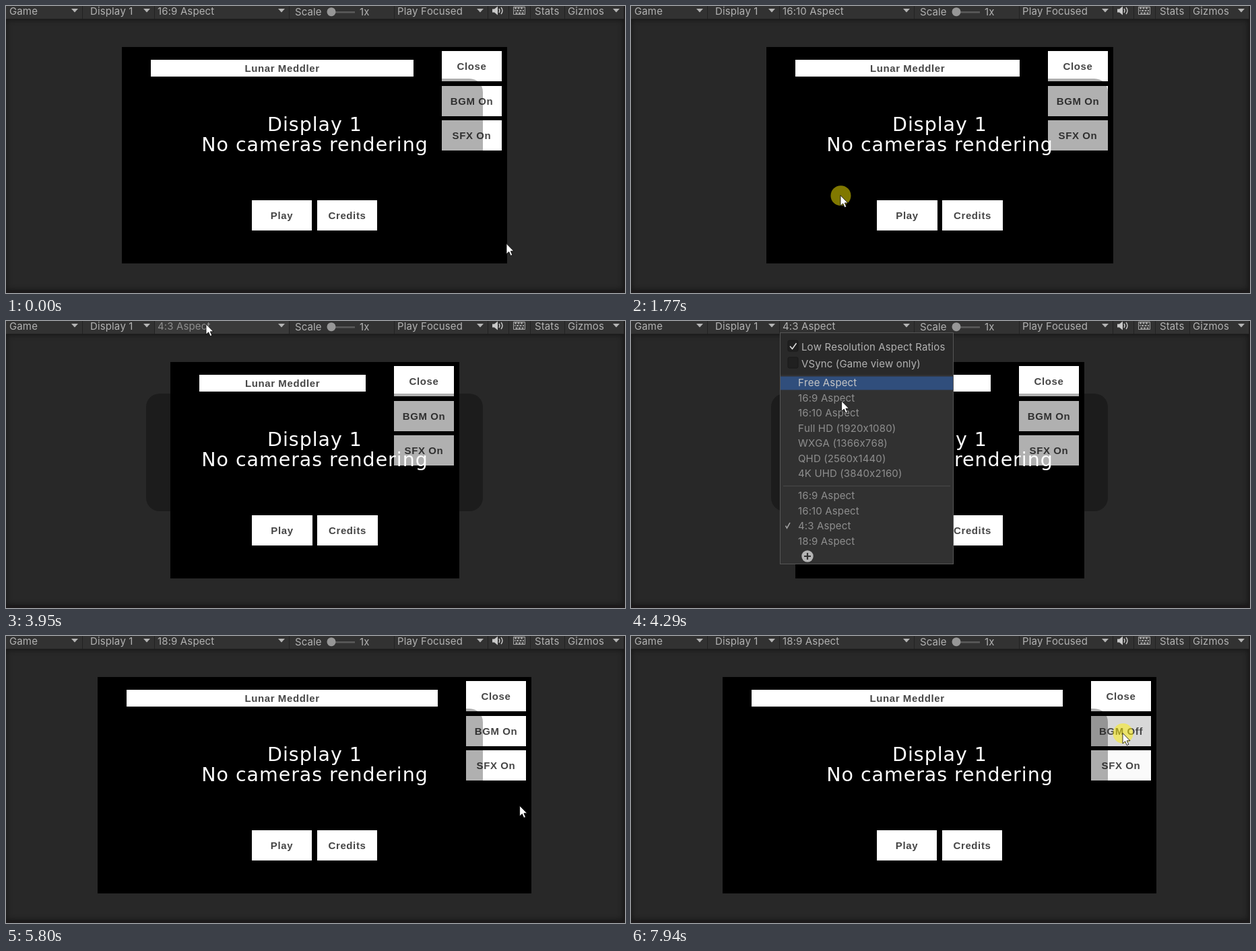
These frames come from a looping animation (919 px wide and 427 px high, 8 s). An HTML page:

```html
<!DOCTYPE html>
<html lang="en">
<head>
<meta charset="utf-8">
<title>Game view</title>
<style>
  html, body { margin: 0; width: 100%; height: 100%; overflow: hidden; background: #282828; }
  #panel { position: absolute; left: 0; top: 20px; width: 917px; height: 403px; box-shadow: inset 0 0 9px #141414; }
  svg { position: absolute; left: 0; top: 0; display: block; }
  text { white-space: pre; }
  .ui {
    font: 15px Inter, sans-serif; letter-spacing: .13px; fill: #b2b2b2;
    font-kerning: none; font-feature-settings: "calt" 0;
  }
  .dim { fill: #8e8e8e; }
  .lit { fill: #c6c6c6; }
  .label { font: bold 15px "Liberation Sans", Arial, sans-serif; letter-spacing: .6px; fill: #464646; text-anchor: middle; }
  .notice { font: 28.5px "DejaVu Sans", Verdana, sans-serif; letter-spacing: .95px; fill: #fff; text-anchor: middle; }
</style>
</head>
<body>
<div id="panel"></div>
<svg id="stage" width="919" height="427" viewBox="0 0 919 427">
  <rect y="423" width="919" height="4" fill="#1c191a"/>
  <rect x="917" width="2" height="427" fill="#1c1a1a"/>
  <g id="toolbar"></g>
  <g id="game"></g>
  <rect x="208" y="108" width="500" height="175" rx="20" opacity=".31"/>
  <text class="notice" x="458.5" y="186">Display 1</text>
  <text class="notice" x="458.5" y="216">No cameras rendering</text>
  <g id="menu"></g>
  <circle id="ring" r="15" fill="#fff000" opacity=".5"/>
  <path id="cursor" d="M-1 -.5v15.5l3.7-3.3 2.5 5.8 2.6-1.1-2.5-5.6h4.7z" fill="#fff" stroke="#000" stroke-width=".8"/>
</svg>
<script>
const LOOP = 8000;
const $ = id => document.getElementById(id);

function add(parent, tag, attrs, content = '') {
  const node = document.createElementNS('http://www.w3.org/2000/svg', tag);
  set(node, attrs);
  node.textContent = content;
  return parent.appendChild(node);
}
function set(node, attrs) {
  for (const key in attrs) node.setAttribute(key, attrs[key]);
}
const show = (node, on) => set(node, { visibility: on ? 'visible' : 'hidden' });
const rect = (parent, x, y, width, height, fill) => add(parent, 'rect', { x, y, width, height, fill });
const text = (parent, x, y, content, cls = 'ui') => add(parent, 'text', { x, y, class: cls }, content);
const path = (parent, d, stroke, width) =>
  add(parent, 'path', { d, fill: 'none', stroke, 'stroke-width': width });

// Toolbar
const bar = $('toolbar');
rect(bar, 0, 0, 917, 19, '#323232');
rect(bar, 0, 19, 917, 1.5, '#1d1d1d');
const aspectBox = rect(bar, 221, 0, 199, 19, '#3a3a3a');

// Each cell: left edge, label, baseline and whether it drops down at its right edge.
function cell(left, right, label, baseline, drops) {
  rect(bar, right, 0, 1, 19, '#222');
  if (drops) add(bar, 'path', { d: `M${right - 16} 4h10l-5 5.5z`, fill: '#b4b4b4' });
  return text(bar, left + 5, baseline, label);
}
cell(0, 113, 'Game', 13, true);
cell(120, 220, 'Display 1', 13, true);
const aspectLabel = cell(220, 420, '', 13, true);
cell(424, 576, 'Scale', 14);
cell(576, 715, 'Play Focused', 13, true);
set(cell(780, 829, 'Stats', 13), { fill: '#a0a0a0' });
cell(829, 917, 'Gizmos', 13, true);
rect(bar, 746, 0, 1, 19, '#222');
rect(bar, 778, 0, 1, 19, '#222');
rect(bar, 488, 8, 30, 2.5, '#5a5a5a');
add(bar, 'circle', { cx: 483, cy: 8.7, r: 6.5, fill: '#979797' });
text(bar, 525, 14, '1x');
add(bar, 'path', { d: 'M722 4.5h3l5-4v13l-5-4h-3z', fill: '#c8c8c8' });
path(bar, 'M732 4q2 3 0 6M735 2q4 5 0 10', '#c8c8c8', 1.4);
path(bar, 'M753.5 1.5h17v11h-17z', '#a8a8a8', 1);
for (let row = 0; row < 3; row++) {
  const y = 3.4 + row * 3.6;
  set(path(bar, `M755 ${y}h14`, '#a8a8a8', 2.2), { 'stroke-dasharray': '3 1.5', 'stroke-dashoffset': row * 1.5 });
}

// Game screen: 322 px high, centred, as wide as the aspect asks for
const SCREEN_H = 322;
const layouts = [[16, 9], [16, 10], [4, 3], [18, 9]].map(([w, h]) => {
  const width = Math.round(SCREEN_H * w / h);
  return { name: `${w}:${h} Aspect`, width, x: Math.floor(458.5 - width / 2) };
});
const game = $('game');
const screen = rect(game, 0, 61, 0, SCREEN_H, '#000');
function button(y, height, content = '') {
  const box = rect(game, 0, y, 89, height, '#fff');
  const label = text(game, 0, y + height / 2 + 5.3, content, 'label');
  return {
    label, box,
    place(x, width) {
      set(box, { x, width });
      set(label, { x: x + width / 2 });
    },
  };
}
const title = button(80, 25, 'Lunar Meddler');
const play = button(289, 45, 'Play');
const credits = button(289, 45, 'Credits');
const close = button(67, 45, 'Close');
const bgm = button(119, 45);
const sfx = button(170, 45);

// Aspect menu
const menu = $('menu');
set(rect(menu, 221.5, 17.5, 257, 344, '#313131'), { stroke: '#565656' });
rect(menu, 222, 18, 256, 62, '#292929');
for (const y of [29, 54]) set(rect(menu, 233, y, 15, 16, '#202020'), { rx: 2, stroke: '#191919' });
path(menu, 'M236 37.5l3.5 4 6-8.5', '#dcdcdc', 1.6);
text(menu, 253, 44, 'Low Resolution Aspect Ratios');
text(menu, 253, 69, 'VSync (Game view only)');
const highlight = rect(menu, 222, 0, 256, 20, '#304e7c');
const presets = ['Free Aspect', '16:9 Aspect', '16:10 Aspect', 'Full HD (1920x1080)', 'WXGA (1366x768)',
  'QHD (2560x1440)', '4K UHD (3840x2160)'];
const rowY = i => 92 + 22.5 * i + (i < presets.length ? 0 : 10.2);
const layoutY = i => rowY(presets.length + i);
const rows = [...presets, ...layouts.map(l => l.name)]
  .map((name, i) => text(menu, 248, rowY(i) + 5.3, name, 'ui dim'));
rect(menu, 226, 245, 248, 1, '#4a4a4a');
const tick = path(menu, 'M229.5 0l2 3.5 4.5-8', '#a4a4a4', 1.5);
add(menu, 'circle', { cx: 262, cy: 350, r: 8.7, fill: '#b4b4b4' });
path(menu, 'M257 350h10M262 345v10', '#313131', 2.2);

// The pointer glides to each stop; a stop with an action clicks after a short rest.
const TRAVEL = 560, REST = 110, HOLD = 80, FADE = 100;
const stop = (at, x, y, action) => {
  const press = at + REST;
  return { at, x, y, action, press, release: press + HOLD, leave: action ? press + HOLD : at };
};
const stops = [
  stop(0, 744, 354),
  stop(640, 320, 8, 'open'),
  stop(1070, 351, 216),
  stop(1580, 312, layoutY(1), 'pick'),
  stop(2320, 268, 6, 'open'),
  stop(2720, 228, 169),
  stop(3100, 285, layoutY(2), 'pick'),
  stop(3910, 298, 5, 'open'),
  stop(4575, 342, layoutY(3), 'pick'),
  stop(5480, 764, 254),
  stop(6330, 722, 143, 'bgm'),
  stop(6600, 722, 143, 'bgm'),
  stop(6980, 728, 194, 'sfx'),
  stop(7250, 728, 194, 'sfx'),
  stop(7720, 731, 145, 'bgm'),
];
const clicks = stops.filter(s => s.action);
const clamp = v => Math.min(1, Math.max(0, v));
const ease = k => k * k * (3 - 2 * k);

function pointer(t) {
  const i = stops.findIndex(s => s.at > t);
  if (i < 1) return stops.at(-1);
  const from = stops[i - 1], to = stops[i];
  const start = Math.max(from.leave, to.at - TRAVEL);
  const k = ease(clamp((t - start) / (to.at - start)));
  return { x: from.x + (to.x - from.x) * k, y: from.y + (to.y - from.y) * k };
}

function drawToggle(target, name, t) {
  const mine = clicks.filter(c => c.action === name.toLowerCase());
  const off = mine.filter(c => t >= c.release).length % 2;
  const last = mine.findLast(c => t >= c.press);
  const down = last ? clamp((t - last.press) / FADE) - clamp((t - last.release) / FADE) : 0;
  const v = Math.round((last ? 250 : 255) - 50 * down);
  target.label.textContent = `${name} ${off ? 'Off' : 'On'}`;
  set(target.box, { fill: `rgb(${v},${v},${v})` });
}

function drawGame(layout) {
  const mid = layout.x + layout.width / 2;
  const wide = 89 + 2 * (mid % 1);
  set(screen, { x: layout.x, width: layout.width });
  title.place(layout.x + 43, layout.width - 182);
  play.place(Math.floor(mid - 93), wide);
  credits.place(Math.floor(mid + 4), wide);
  for (const b of [close, bgm, sfx]) b.place(layout.x + layout.width - 97, 89);
}

function drawMenu(current, t) {
  // The highlight trails the pointer slightly.
  const { y } = pointer(Math.max(0, t - 20));
  const active = rows.findIndex((_, i) => Math.abs(y - rowY(i)) < 11.25);
  set(highlight, { y: rowY(Math.max(0, active)) - 9.5, opacity: active < 0 ? 0 : 1 });
  rows.forEach((row, i) => set(row, { class: i === active ? 'ui lit' : 'ui dim' }));
  set(tick, { transform: `translate(0 ${layoutY(current)})` });
}

function draw(t) {
  const { x, y } = pointer(t);
  set($('cursor'), { transform: `translate(${x} ${y})` });
  set($('ring'), { cx: x - .5, cy: y });
  show($('ring'), clicks.some(c => t >= c.press && t < c.release + FADE));

  const done = clicks.filter(c => t >= c.release);
  const current = done.filter(c => c.action === 'pick').length;
  const open = done.at(-1)?.action === 'open';
  const hover = !open && y < 19 && x > 221 && x < 420;
  drawGame(layouts[current]);
  drawToggle(bgm, 'BGM', t);
  drawToggle(sfx, 'SFX', t);
  aspectLabel.textContent = layouts[current].name;
  set(aspectLabel, { class: hover ? 'ui dim' : 'ui' });
  show(aspectBox, hover);
  show(menu, open);
  drawMenu(current, t);
}

function frame() {
  draw(performance.now() % LOOP);
  requestAnimationFrame(frame);
}
frame();
</script>
</body>
</html>
```
